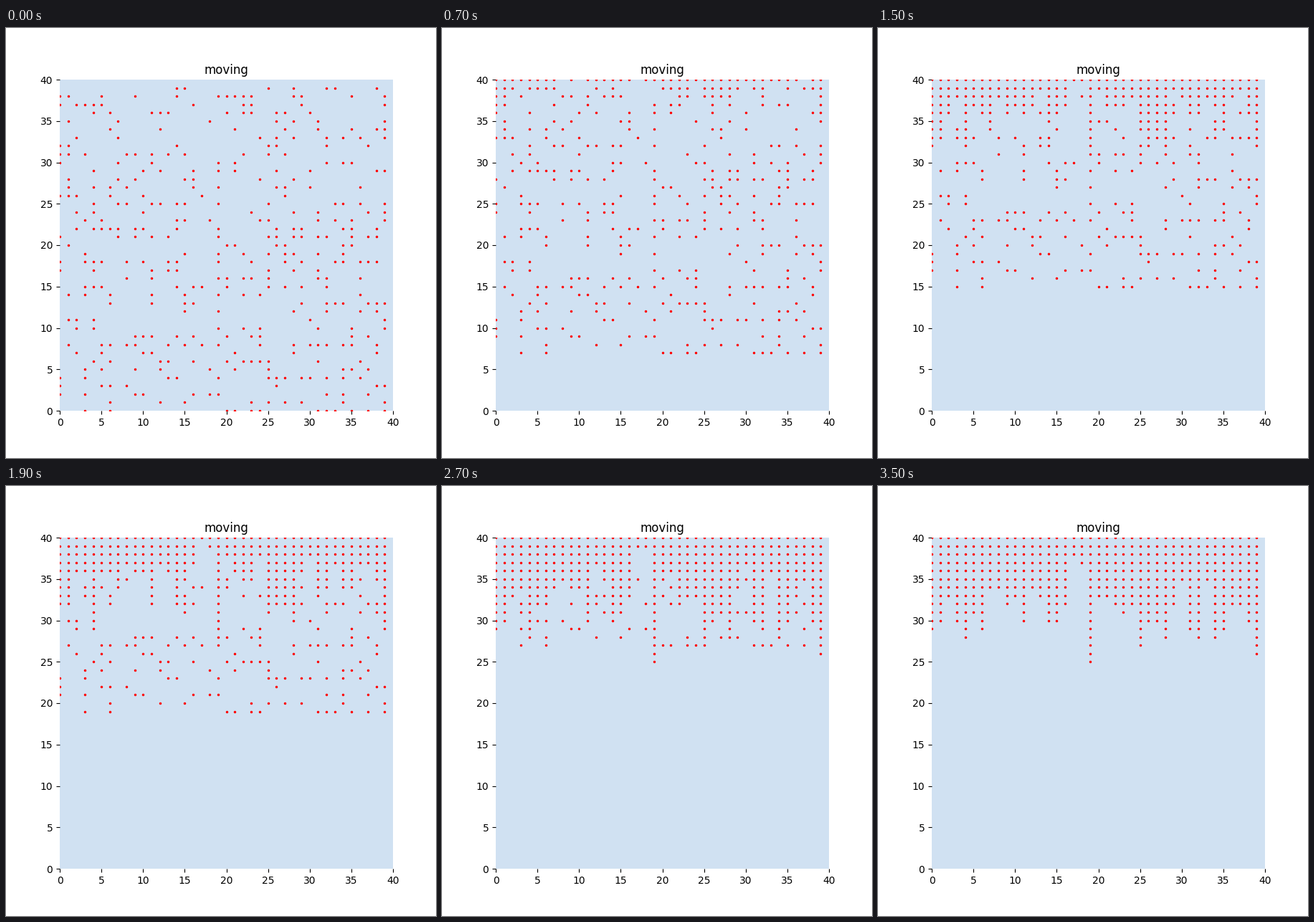
Write a matplotlib script that moves like this. It is 600 px wide and 600 px high and loops after 4.1 s.

```python
import numpy as np
import matplotlib.pyplot as plt
from matplotlib.animation import FuncAnimation

SIZE = 40
DENSITY = 0.25
STEP_MS = 100
STEPS = 35
HOLD = 5  # extra ticks on the settled pile

rng = np.random.default_rng(7)
grid = rng.random((SIZE, SIZE)) < DENSITY  # rows are heights

# Each dot rises one unit per step until it meets the pile under the top edge.
rows, cols = np.nonzero(grid)
count_from_top = np.cumsum(grid[::-1], axis=0)[::-1]
rests = SIZE + 1 - count_from_top[rows, cols]

fig, ax = plt.subplots(figsize=(6, 6), dpi=100)
ax.set_facecolor("#d0e1f2")
ax.set(xlim=(0, SIZE), ylim=(0, SIZE), title="moving")
ax.set_xticks(range(0, SIZE + 1, 5))
ax.set_yticks(range(0, SIZE + 1, 5))
ax.spines[:].set_visible(False)
dots, = ax.plot(cols, rows, "r.", markersize=3)


def update(frame):
    step = min(frame, STEPS)
    dots.set_data(cols, np.minimum(rows + step, rests))
    return dots,


anim = FuncAnimation(fig, update, frames=STEPS + 1 + HOLD,
                     interval=STEP_MS, repeat=True, repeat_delay=0)
plt.show()
```
